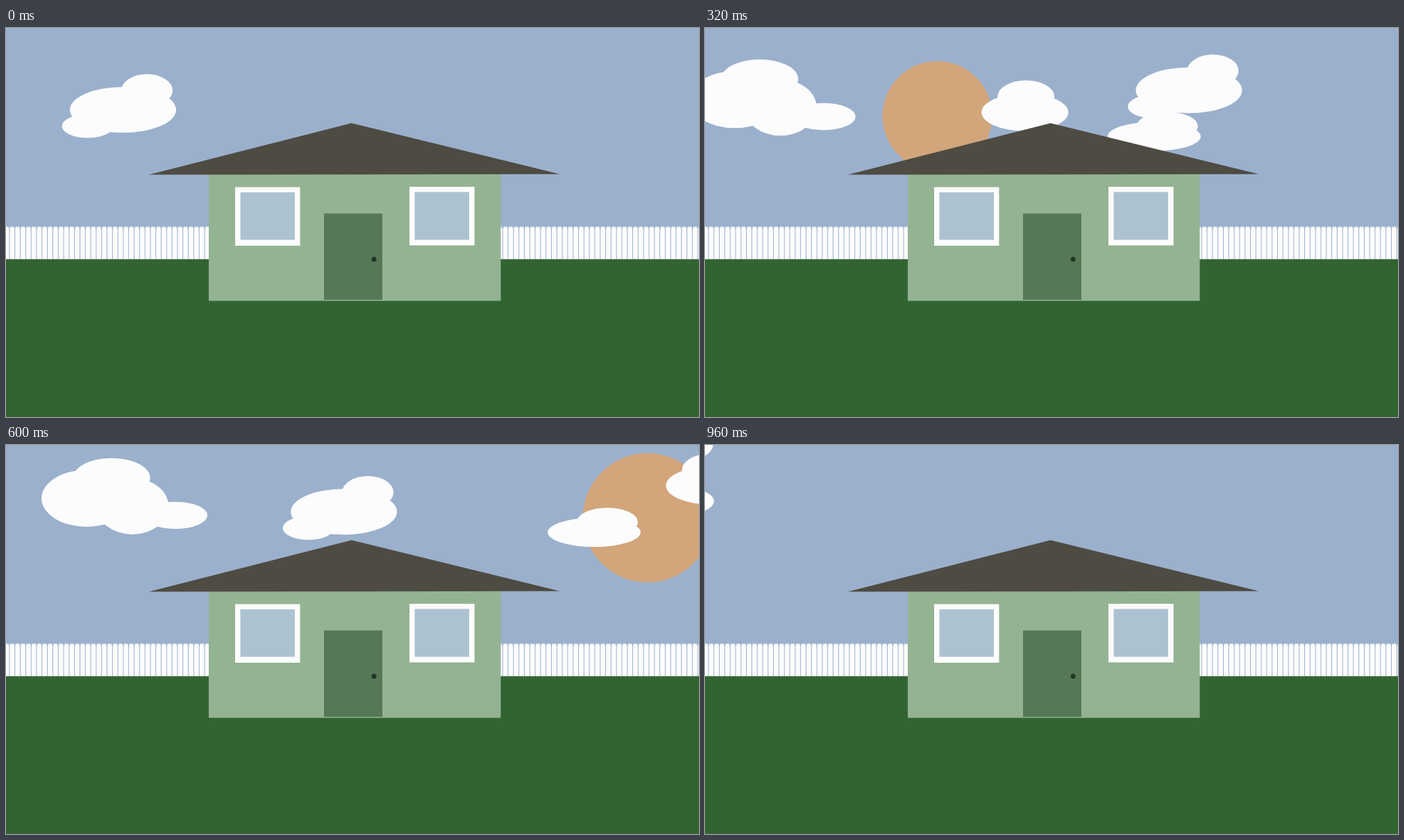
Recreate the animation shown at these times as an HTML page. Size 998 by 561 pixels, loop 1000 ms.

```html
<!DOCTYPE html>
<html lang="en">
<head>
<meta charset="utf-8">
<title>House and sky</title>
<style>
html, body { margin: 0; width: 100%; height: 100%; overflow: hidden; background: #9bb0cc; }
svg { display: block; width: 100vw; height: 100vh; }
.white { fill: #fcfcfc; }
.glass { fill: #adc2d1; }
</style>
</head>
<body>
<svg viewBox="0 0 998 561" preserveAspectRatio="none">
  <defs>
    <pattern id="pickets" x="5.5" y="286.5" width="7.805" height="60" patternUnits="userSpaceOnUse">
      <rect class="white" width="6.8" height="64" rx="3.4"/>
    </pattern>
  </defs>
  <rect width="998" height="561" fill="#9bb0cc"/>
  <circle id="sun" r="1" fill="#d2a57b"/>
  <g class="white">
    <g id="big">
      <ellipse cx="-174" cy="-24.5" rx="65" ry="41"/>
      <ellipse cx="-138" cy="-54" rx="55.5" ry="28.5"/>
      <ellipse cx="-108" cy="-13" rx="52" ry="40.5"/>
      <ellipse cx="-46" rx="46" ry="19.5"/>
    </g>
    <g id="long">
      <ellipse rx="76.5" ry="33"/>
      <ellipse cx="34.5" cy="-28" rx="37" ry="23.5"/>
      <ellipse cx="-51" cy="23.5" rx="37" ry="17"/>
    </g>
    <g id="round">
      <ellipse rx="62.5" ry="27"/>
      <ellipse cx="1.5" cy="-22.5" rx="41" ry="23.5"/>
    </g>
    <g id="flat">
      <ellipse rx="67" ry="21"/>
      <ellipse cx="19" cy="-15" rx="44" ry="20.5"/>
    </g>
  </g>
  <rect y="286.5" width="998" height="47" fill="url(#pickets)"/>
  <rect y="333.5" width="998" height="228" fill="#326432"/>
  <rect x="292" y="210" width="420.5" height="183.5" fill="#94b393"/>
  <path d="M206 211.5 497.5 137.3 797.5 210.8Z" fill="#4e4b43"/>
  <rect class="white" x="330" y="229.5" width="93.5" height="84.5"/>
  <rect class="glass" x="337.5" y="237" width="78.5" height="68.5"/>
  <rect class="white" x="581" y="229" width="93.7" height="84.5"/>
  <rect class="glass" x="588.5" y="236.5" width="78.5" height="69"/>
  <rect x="458" y="267.5" width="84" height="124.5" fill="#567857"/>
  <circle cx="530" cy="333.5" r="3.5" fill="#1f3522"/>
</svg>
<script>
const STEP = 40, LOOP = 1000;

// Everything drifts in, turns sharply at its own step and drifts out.
// Points are x, y (and radius): enter, mid, turn, mid, leave.
const movers = {
  sun:   { turn: 15,   points: [[-281, 73, 20.6], [19, 110.5, 55.5], [924, 105, 93.3], [530, 163.5, 81], [-403, 399, 42]] },
  big:   { turn: 12.5, points: [[-48, 134], [86, 133.5], [360, 115], [232, 93], [13, 81]] },
  long:  { turn: 9,    points: [[168.5, 118], [242.5, 63.5], [870, 109], [344, 113], [-213, 254]] },
  round: { turn: 15.1, points: [[-295, 177], [99.5, 151.5], [1020, 57.5], [718, 87], [-51, 0]] },
  flat:  { turn: 15,   points: [[-235, 80], [293, 133], [847, 126], [698.5, 135.5], [-780, 143]] }
};

// Value at t of the parabola through three timed values
function parabola(t, [a, b, c], [p, q, r]) {
  return p * (t - b) * (t - c) / ((a - b) * (a - c))
    + q * (t - a) * (t - c) / ((b - a) * (b - c))
    + r * (t - a) * (t - b) / ((c - a) * (c - b));
}

function place({ turn, points }, t) {
  const from = t < turn ? 0 : 2;
  const times = [0, 4, turn, 17, 24].slice(from, from + 3);
  const leg = points.slice(from, from + 3);
  return leg[0].map((_, axis) => parabola(t, times, leg.map(p => p[axis])));
}

const start = performance.now();

function draw(now) {
  const t = Math.floor((Math.max(0, now - start) % LOOP) / STEP);
  for (const id in movers) {
    const [x, y, size = 1] = place(movers[id], t);
    document.getElementById(id).setAttribute("transform", `translate(${x} ${y}) scale(${size})`);
  }
  requestAnimationFrame(draw);
}
draw(start);
</script>
</body>
</html>
```
